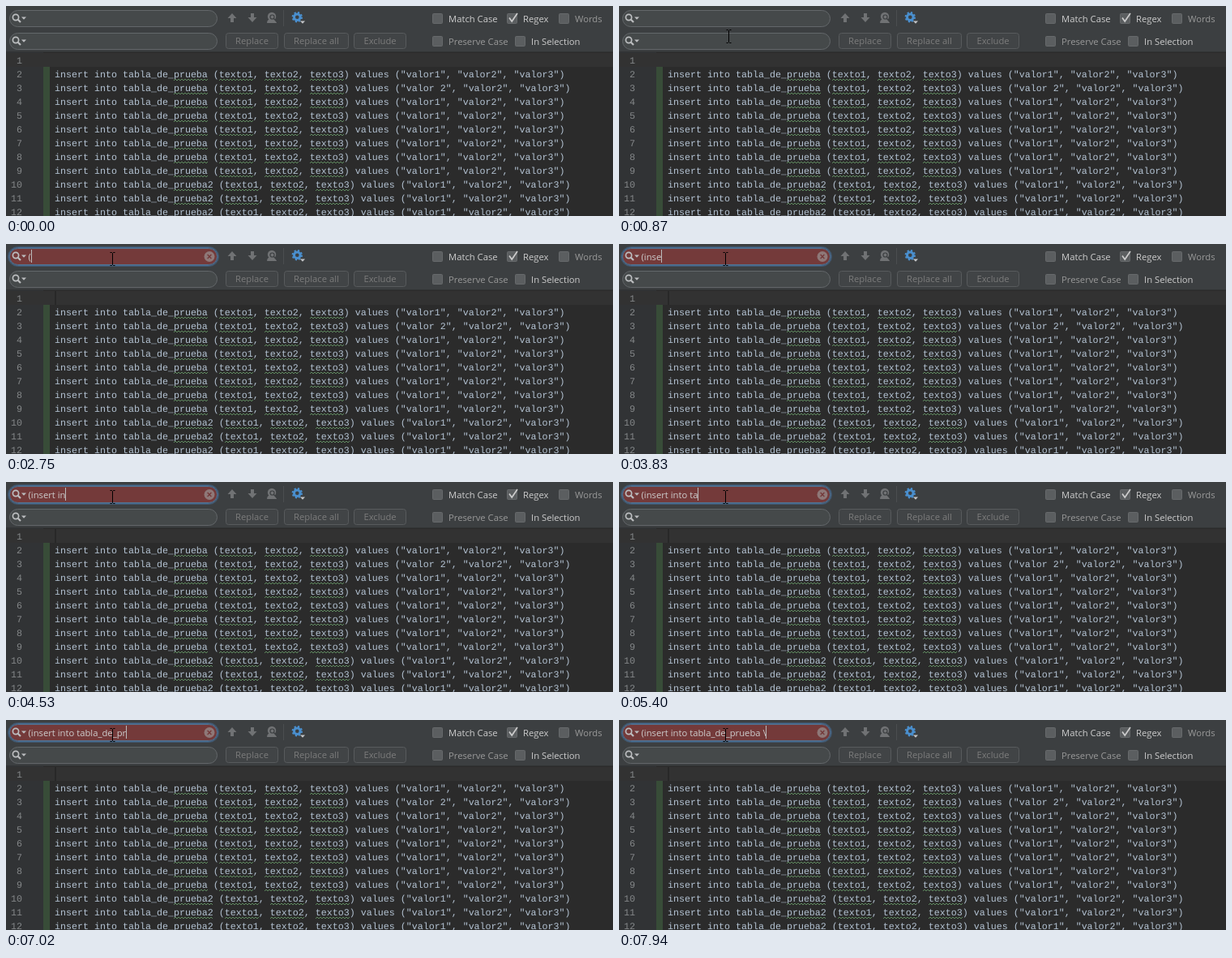
Animation, 749 px wide and 259 px high, one loop 8 s. Source, as an HTML page:

```html
<!DOCTYPE html>
<html lang="es">
<head>
<meta charset="utf-8">
<title>Search and replace</title>
<style>
html, body { margin: 0; width: 100%; height: 100%; overflow: hidden; background: #2b2b2b; }
svg { display: block; }
text { white-space: pre; }
.ui { font: 11.25px "Open Sans", "Noto Sans", sans-serif; fill: #cdcdcd; }
.dim { fill: #999999; }
.off { fill: #7c7c7c; }
.mid { text-anchor: middle; }
.code { font: 11.667px "Liberation Mono", "Courier New", monospace; fill: #b4c3d3; text-rendering: geometricPrecision; }
.num { fill: #85888a; text-anchor: end; }
.wave { fill: none; stroke: #5f8a5f; stroke-width: 1; }
</style>
</head>
<body>
<svg id="stage" width="749" height="259" viewBox="0 0 749 259"></svg>
<script>
const NS = "http://www.w3.org/2000/svg";
const stage = document.getElementById("stage");

function add(tag, attrs, content) {
  const node = document.createElementNS(NS, tag);
  for (const key in attrs) node.setAttribute(key, attrs[key]);
  if (content !== undefined) node.textContent = content;
  stage.appendChild(node);
  return node;
}
const rect = (x, y, width, height, fill, more) => add("rect", { x, y, width, height, fill, ...more });
const path = (d, attrs) => add("path", { d, fill: "none", ...attrs });
const label = (x, y, content, cls = "ui") => add("text", { x, y, class: cls }, content);
const show = (node, on) => node.setAttribute("visibility", on ? "visible" : "hidden");

// Editor
const ROW = 17, TOP = 58, LEFT = 60, CHAR = 7;

function wave(column, count, y) {
  const x = LEFT + column * CHAR;
  let d = `M${x} ${y + 2}`;
  for (let i = 2; i <= count * CHAR; i += 2) d += `L${x + i} ${y + (i % 4 ? 0 : 2)}`;
  path(d, { class: "wave" });
}

function codeRow(n) {
  const y = TOP + (n - 1) * ROW;
  label(20, y + 13, n, "code num");
  if (n === 1) return;
  const word = n < 10 ? "prueba" : "prueba2";
  const first = n === 3 ? "valor 2" : "valor1";
  const line = `insert into tabla_de_${word} (texto1, texto2, texto3) values ("${first}", "valor2", "valor3")`;
  label(LEFT, y + 13, line, "code");
  for (const name of [word, "texto1", "texto2", "texto3"]) wave(line.indexOf(name), name.length, y + 15);
}

rect(0, 0, 749, 259, "#2b2b2b");
rect(0, 57, 46, 202, "#313335");
rect(0, TOP, 749, ROW, "#323232");
rect(46, TOP + ROW, 8, 184, "#384c38");
for (let n = 1; n <= 12; n++) codeRow(n);
const editorCaret = rect(60, TOP, 2, ROW, "#282828");

// Search panel
rect(0, 0, 749, 57, "#3c3f41");
rect(0, 56, 749, 1, "#323435");

function field(y) {
  return rect(4.5, y + 0.5, 256, 20, "#45494a", { rx: 10, stroke: "#63676a" });
}
function magnifier(y) {
  add("circle", { cx: 12, cy: y - 1, r: 3.6, fill: "none", stroke: "#bcbec0", "stroke-width": 1.7 });
  path(`M14.7 ${y + 1.7}L18 ${y + 5}`, { stroke: "#bcbec0", "stroke-width": 2.2 });
  path(`M19 ${y - 1.5}h6l-3 3.2z`, { style: "fill:#bcbec0" });
}
const search = field(5);
const glow = [1, 2].map(d => rect(4.5 - d, 5.5 - d, 256 + 2 * d, 20 + 2 * d, "none",
  { rx: 10 + d, stroke: "#4a78aa", "stroke-opacity": 1.1 - d * 0.35 }));
field(33);
magnifier(15);
magnifier(43);

const clear = add("circle", { cx: 251, cy: 15.5, r: 6.5, fill: "#8e7878" });
const cross = path("M248.6 13.1l4.8 4.8m0-4.8l-4.8 4.8", { stroke: "#743a3a", "stroke-width": 1.4 });
const query = label(27.5, 20, "");
const queryCaret = rect(27, 7, 1, 16, "#bbbbbb");

const grey = "#707274";
path("M279 9l5.5 6h-3.5v5h-4v-5h-3.5z", { style: `fill:${grey}` });
path("M304 20l5.5-6h-3.5v-5h-4v5h-3.5z", { style: `fill:${grey}` });
add("circle", { cx: 328, cy: 13, r: 5.2, fill: grey });
path("M322 21q0-5 6-5t6 5z", { style: `fill:${grey}` });
add("circle", { cx: 328.5, cy: 13.5, r: 2.5, fill: "none", stroke: "#3c3f41", "stroke-width": 1.2 });
path("M330.5 15.5l4.5 5", { stroke: "#3c3f41", "stroke-width": 1.3 });
rect(342, 5, 1, 20, "#4b4e50");

const blue = "#4a8fce";
add("circle", { cx: 359.3, cy: 13.7, r: 3.8, fill: "none", stroke: blue, "stroke-width": 3 });
add("circle", { cx: 359.3, cy: 13.7, r: 5.6, fill: "none", stroke: blue, "stroke-width": 2.2, "stroke-dasharray": 5.6 * Math.PI / 8 });
path("M363 18.5h6l-3 3.2z", { style: "fill:#c4c6c8" });

function button(x, width, name) {
  rect(x + 0.5, 33.5, width - 1, 19, "#414446", { rx: 3, stroke: "#585b5d" });
  label(x + width / 2, 47, name, "ui off mid");
}
button(271, 65, "Replace");
button(343, 80, "Replace all");
button(429, 65, "Exclude");

function checkbox(x, y, name, dim, checked) {
  rect(x + 0.5, y + 0.5, 12, 12, "#5b5e60", { rx: 1, stroke: "#66696b" });
  if (checked) path(`M${x + 3} ${y + 5.5}l3.2 4.5l6.8-10`, { stroke: "#cccccc", "stroke-width": 1.7 });
  label(x + 20, y + 11, name, dim ? "ui dim" : "ui");
}
checkbox(526, 9, "Match Case");
checkbox(618, 9, "Regex", false, true);
checkbox(682, 9, "Words", true);
checkbox(526, 37, "Preserve Case", true);
checkbox(628, 37, "In Selection");

const pointer = path("M-3-8h2l1 1l1-1h2M0-7v14M-3 8h2l1-1l1 1h2", { stroke: "#000" });

// Timeline
const LOOP = 8000, FOCUS = 1490, ERROR = 2750;
const moves = [
  [470, 148, 96], [540, 146, 86], [610, 143, 73], [690, 140, 58], [770, 137, 46],
  [870, 135, 37], [1010, 134, 31], [1120, 133, 25], [1240, 132, 20], [1390, 131, 18]
];
// Each burst types its pieces evenly between two times.
const bursts = [
  [2750, 2750, ["("]],
  [3370, 3870, [..."inser"]],
  [4210, 4530, [..."t in"]],
  [4810, 4960, ["to", " "]],
  [5240, 5840, [..."tabla_"]],
  [6220, 6500, [..."de_"]],
  [6820, 7520, [..."prueba "]],
  [7940, 7940, ["\\"]]
];
const keys = bursts.flatMap(([from, to, parts]) =>
  parts.map((part, i) => [from + (to - from) * i / Math.max(1, parts.length - 1), part]));

function draw(t) {
  const focused = t >= FOCUS, failed = t >= ERROR;
  show(editorCaret, (t >= 70 && t < 570) || t >= 1070);

  const move = moves.filter(m => t >= m[0]).pop();
  show(pointer, !!move);
  if (move) pointer.setAttribute("transform", `translate(${move[1] + 0.5} ${move[2] + 0.5})`);

  for (const layer of glow) show(layer, focused);
  search.setAttribute("fill", failed ? "#743a3a" : "#45494a");
  search.setAttribute("stroke", focused ? "#53718e" : "#63676a");
  show(clear, failed);
  show(cross, failed);

  query.textContent = keys.filter(k => t >= k[0]).map(k => k[1]).join("");
  const width = query.textContent ? query.getComputedTextLength() : 0;
  queryCaret.setAttribute("x", Math.floor(27.8 + width));
  const blinkedOff = (t >= 1950 && t < 2510) || (t >= 3250 && t < 3370);
  show(queryCaret, focused && !blinkedOff);
}

const start = performance.now();
function tick() {
  draw((performance.now() - start) % LOOP);
  requestAnimationFrame(tick);
}
tick();
</script>
</body>
</html>
```
